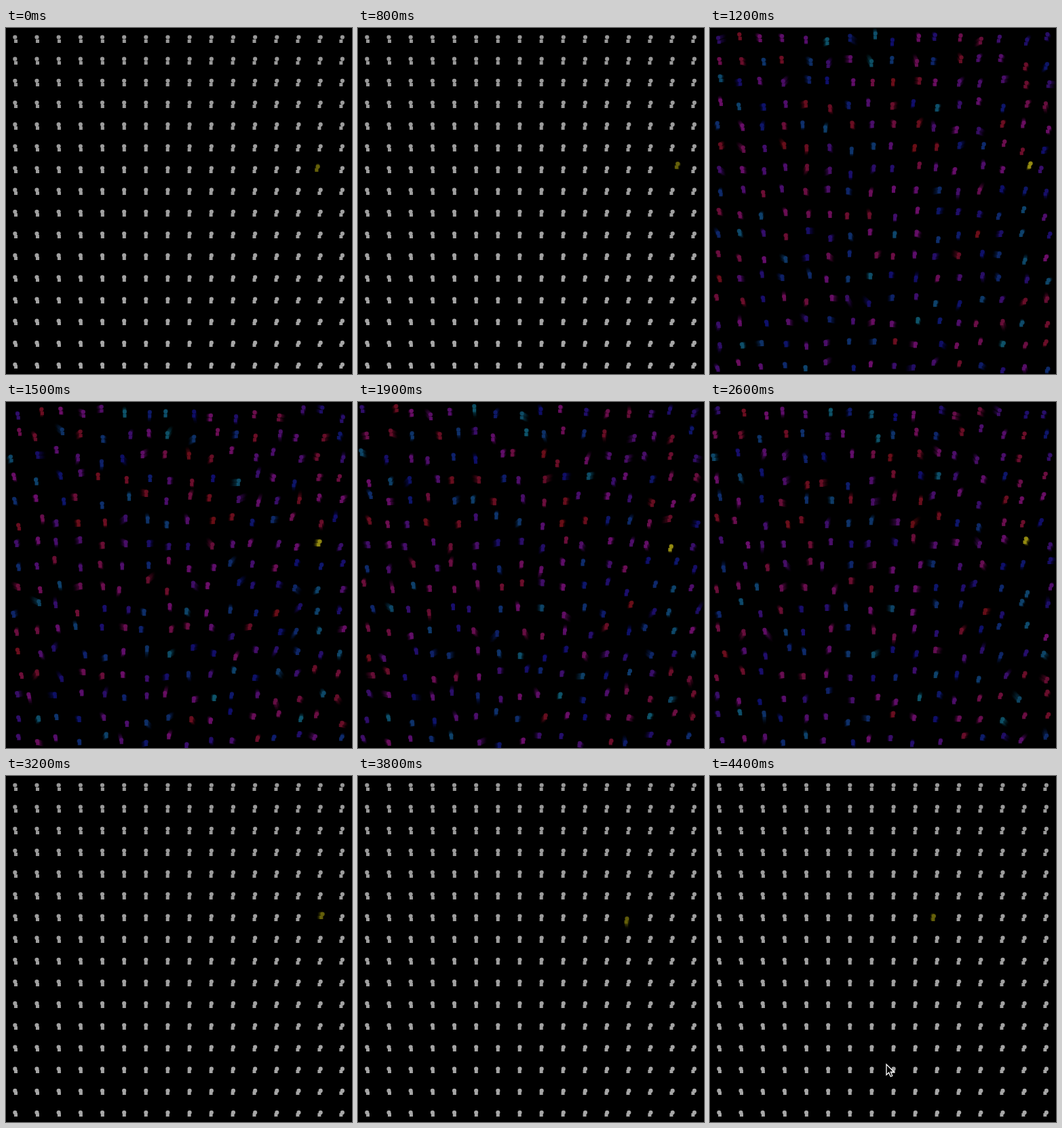
An HTML page with a canvas for the animation above (4.5 s loop, 510 px wide and 510 px high).

```html
<!DOCTYPE html>
<html>
<head>
<meta charset="utf-8">
<style>
html, body { margin: 0; width: 100%; height: 100%; overflow: hidden; background: #000; }
canvas { display: block; }
</style>
</head>
<body>
<canvas id="stage" width="510" height="510"></canvas>
<script>
const ctx = document.getElementById("stage").getContext("2d");
const LOOP = 4500, STEP = 100, SIZE = 16, GAP = 32.17;
const ACTIVE_FROM = 9, ACTIVE_TO = 27;
const MARK_ROW = 6, TRAIL = 7;

// Marker offset from its home cell: [step, dx, dy]
const markPath = [[0, -4, -2], [12, 9, -7], [15, -1, -1], [19, -2, 6],
  [23, 5, -3], [32, 3, -3], [44, -5, 0], [45, -4, -2]];
const pointer = { 23: [247, 342], 24: [251, 400], 43: [259, 455], 44: [260, 425] };
const arrow = new Path2D("M0 0V15.5L3.6 12.2L6.2 18L8.8 16.9L6.3 11.2H11.2Z");

// Integer hash of two numbers, 0 to 1
function rand(a, b) {
  let h = Math.imul(a, 0x9e3779b1) ^ Math.imul(b, 0x85ebca6b);
  h = Math.imul(h ^ h >>> 15, 0x2c1b3c6d);
  h = Math.imul(h ^ h >>> 12, 0x297a2d39);
  return ((h ^ h >>> 15) >>> 0) / 2 ** 32;
}

// Roughly normal, deviation 1
function spread(a, b) {
  return 2 * (rand(a, b) + rand(a, b + 1000) + rand(a, b + 2000) - 1.5);
}

function figure(x, y, col, row) {
  const bodyX = x + 1.2 - 3.2 * col / 15;
  const bottom = y + 8.5 - 2.5 * row / 15;
  ctx.beginPath();
  ctx.arc(x, y, 3.1, 0, 7);
  ctx.rect(bodyX - 2.5, bottom - 5, 5, 5);
  ctx.fill();
}

function streak(x, y, tailX, tailY, col, row, color) {
  ctx.fillStyle = color;
  for (let k = TRAIL; k >= 0; k--) {
    ctx.globalAlpha = k ? 0.22 * (1 - k / (TRAIL + 1)) : 0.8;
    figure(x + tailX * k / TRAIL, y + tailY * k / TRAIL, col, row);
  }
  ctx.globalAlpha = 1;
}

function markOffset(n) {
  const i = markPath.findIndex(p => p[0] > n);
  const [n0, x0, y0] = markPath[i - 1], [n1, x1, y1] = markPath[i];
  const u = (n - n0) / (n1 - n0);
  const shake = 3.5 * Math.sin(Math.PI * u);
  return [x0 + (x1 - x0) * u + shake * spread(n, 401),
          y0 + (y1 - y0) * u + shake * spread(n, 402)];
}

function draw(n) {
  const active = n >= ACTIVE_FROM && n < ACTIVE_TO;
  const markCol = 14 - Math.max(0, Math.min(4, Math.floor((n - 34) / 2)));
  const reach = Math.min(4.2, 3 + 0.4 * Math.max(0, n - 12));
  ctx.fillStyle = "#000";
  ctx.fillRect(0, 0, 510, 510);

  for (let row = 0; row < SIZE; row++) {
    for (let col = 0; col < SIZE; col++) {
      const id = row * SIZE + col + 1;
      const x = 13.3 + GAP * col, y = 13.5 + GAP * row;
      const tailX = 4.2 * spread(id, n + 100), tailY = 4.2 * spread(id, n + 200);
      if (row === MARK_ROW && col === markCol) {
        const [dx, dy] = markOffset(n);
        streak(x + dx, y + dy, tailX, tailY, col, row, active ? "#a59b14" : "#716b0c");
      } else if (active) {
        const hue = 193 + 162 * rand(id, 7);
        streak(x + reach * spread(id, n + 300), y + reach * spread(id, n + 400),
          tailX, tailY, col, row, `hsl(${hue} 76% 26%)`);
      } else {
        const grey = 152 + row;
        ctx.fillStyle = `rgb(${grey} ${grey} ${grey})`;
        figure(x, y, col, row);
      }
    }
  }

  if (pointer[n]) {
    ctx.save();
    ctx.translate(...pointer[n]);
    ctx.fillStyle = "#000";
    ctx.strokeStyle = "#fff";
    ctx.lineWidth = 1.3;
    ctx.fill(arrow);
    ctx.stroke(arrow);
    ctx.restore();
  }
}

let last = -1;
const start = performance.now();
function tick() {
  const n = Math.floor((performance.now() - start) % LOOP / STEP);
  if (n !== last) draw(last = n);
  requestAnimationFrame(tick);
}
tick();
</script>
</body>
</html>
```
